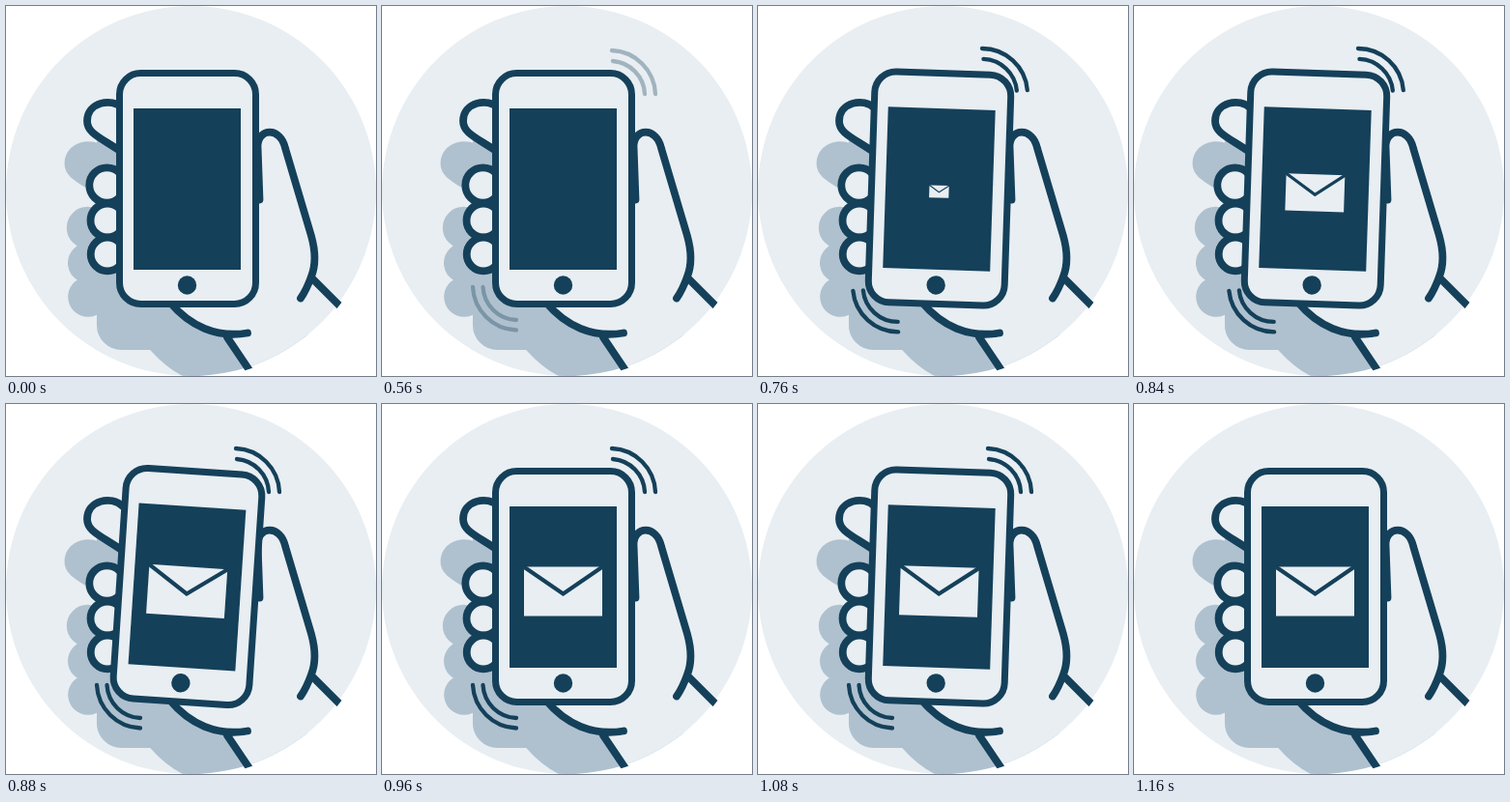
An HTML page that plays this animation: 383 px wide and 383 px high, repeating every 2 s.

```html
<!DOCTYPE html>
<html lang="en">
<head>
<meta charset="utf-8">
<title>Phone notification</title>
<style>
  html, body { margin: 0; width: 100%; height: 100%; overflow: hidden; background: #fff; }
  svg { display: block; width: 100%; height: 100%; }
  .line { fill: none; stroke: #15405a; stroke-width: 7.8; stroke-linecap: round; stroke-linejoin: round; }
  .light { fill: #e8eef2; }
  .navy { fill: #15405a; }
</style>
</head>
<body>
<svg viewBox="0 0 383 383">
  <defs>
    <clipPath id="disc"><circle cx="191.5" cy="191.5" r="191.5"/></clipPath>
    <clipPath id="rim"><circle cx="191.5" cy="191.5" r="194"/></clipPath>
    <path id="palm" d="M150 290L172 310C188 328 208 341 229 343L256 383L400 400L346 313L314 282L318 250L289 147C284 125 260 126 260 145Z"/>
    <g id="fingers">
      <path d="M121 106C109 94 84 100 84 119C84 132 98 136 121 152"/>
      <circle cx="104.500" cy="185.500" r="18.200"/>
      <circle cx="105" cy="222" r="17.500"/>
      <circle cx="105" cy="257" r="17.300"/>
    </g>
    <rect id="body" x="117.500" y="69.500" width="141" height="239" rx="22"/>
  </defs>

  <g clip-path="url(#disc)">
    <rect class="light" width="383" height="383"/>
    <g transform="translate(-20 44)" fill="#afc1cf" stroke="#afc1cf" stroke-width="7">
      <use href="#palm"/><use href="#fingers"/><use href="#body"/>
    </g>
    <use href="#palm" class="light"/>
  </g>

  <g class="line" clip-path="url(#rim)">
    <use href="#fingers" class="light"/>
    <path d="M262.500 200.500L260.500 145C261 126 284 125 289 147L316 238C321 256 320 270 316 280Q311 294 305 302.500"/>
    <path d="M317 282L352 317M170 307C190 331 218 344 250 338.500M229 343L258 386"/>
  </g>

  <g id="waves" class="line" style="stroke-width:4.3">
    <path d="M238 46A47 47 0 0 1 283 91M239 57A36 36 0 0 1 272 91"/>
    <path d="M94 291A47 47 0 0 0 139 335.500M104.500 291A36 36 0 0 0 139 325"/>
  </g>

  <g id="phone">
    <use href="#body" class="line" style="fill:#e8eef2;stroke-width:7"/>
    <rect class="navy" x="132" y="106" width="111" height="167"/>
    <circle class="navy" cx="187.500" cy="289" r="9.700"/>
    <g id="mail">
      <rect class="light" x="147" y="168.500" width="81" height="51"/>
      <path class="line" style="stroke-width:4.2;stroke-linecap:butt;stroke-linejoin:miter" d="M146 168L187.500 196.500L229 168"/>
    </g>
  </g>
</svg>
<script>
  const LOOP = 2000, STEP = 40, SHAKE_START = 560, SHAKE_STEPS = 15;
  const [phone, waves, mail] = ["phone", "waves", "mail"].map(id => document.getElementById(id));
  const swing = [3.8, 1.9, 0, 1.9];
  const clamp = v => Math.max(0, Math.min(1, v));
  const turn = (el, angle) => el.setAttribute("transform", `rotate(${angle} 187.5 189)`);

  function draw(time) {
    const step = Math.floor((time % LOOP - SHAKE_START) / STEP);
    const shaking = step > 0 && step < SHAKE_STEPS;
    turn(phone, shaking ? swing[step % 4] : 0);

    // The waves jump back on every other step and fade at both ends.
    turn(waves, shaking && step < 13 && step % 2 ? -2.4 : 0);
    waves.setAttribute("opacity", clamp(Math.min((step + 1) / 3, (SHAKE_STEPS - step) / 2)));

    const size = clamp((step - 4) / 4);
    mail.setAttribute("transform", `translate(187.5 191.5) scale(${size}) translate(-187.5 -191.5)`);
    mail.style.display = size ? "" : "none";
  }

  const start = performance.now();
  function tick() {
    draw(performance.now() - start);
    requestAnimationFrame(tick);
  }
  tick();
</script>
</body>
</html>
```
